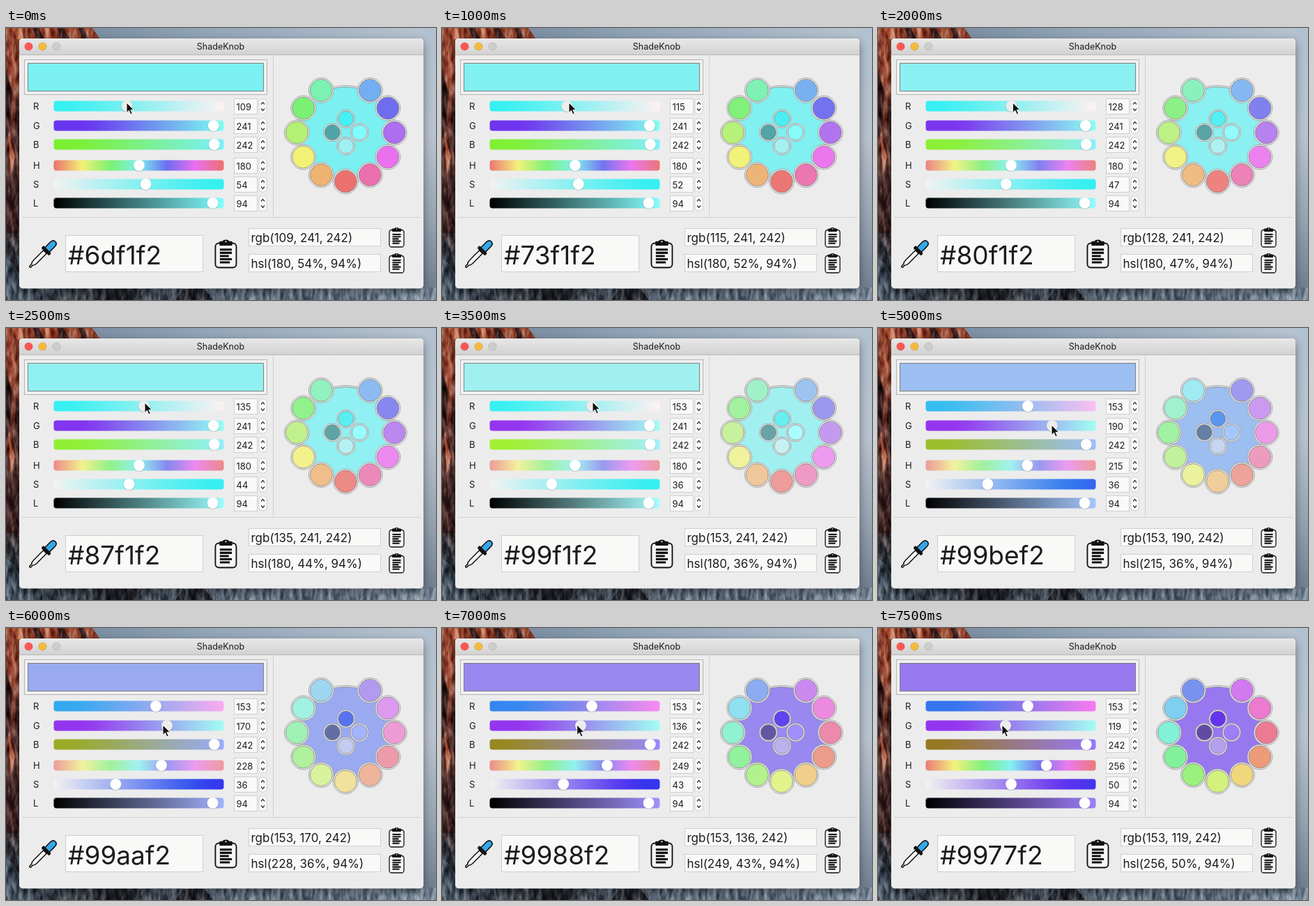
An HTML page for the animation above (8 s loop, 617x390 px).

```html
<!DOCTYPE html>
<html lang="en">
<head>
<meta charset="utf-8">
<title>ShadeKnob</title>
<style>
html, body { margin: 0; width: 100%; height: 100%; overflow: hidden; }
svg { display: block; width: 617px; height: 390px; }
text { font-family: Inter, sans-serif; font-size: 13px; fill: #1c1c1c; }
.big { font-size: 37px; }
.code { font-size: 17px; }
.field { fill: #f9faf8; stroke: #cfcfcf; }
.ring { fill: #f2f2f2; stroke: #9a9a9a; stroke-width: .9; }
.dot { stroke: #808080; stroke-width: .8; }
</style>
</head>
<body>
<svg id="stage" viewBox="0 0 617 390">
  <defs>
    <linearGradient id="sky" x1="0" x2="1" y1="0" y2=".25">
      <stop offset="0" stop-color="#6a7c92"/><stop offset=".45" stop-color="#93a5b8"/><stop offset="1" stop-color="#bcc8d4"/>
    </linearGradient>
    <linearGradient id="edge" x1="0" x2="0" y1="0" y2="1">
      <stop offset="0" stop-color="#b2c1d0"/><stop offset=".4" stop-color="#b9c3cf"/><stop offset=".7" stop-color="#98a4b2"/><stop offset="1" stop-color="#6a7a8b"/>
    </linearGradient>
    <linearGradient id="cliff" x1="0" x2="0" y1="0" y2="1">
      <stop offset="0" stop-color="#94452f"/><stop offset=".3" stop-color="#8a4435"/><stop offset=".6" stop-color="#452b2a"/><stop offset="1" stop-color="#333c47"/>
    </linearGradient>
    <linearGradient id="ground">
      <stop offset="0" stop-color="#44525f"/><stop offset=".25" stop-color="#33363d"/><stop offset=".42" stop-color="#566270"/><stop offset="1" stop-color="#748495"/>
    </linearGradient>
    <linearGradient id="bar" x1="0" x2="0" y1="0" y2="1">
      <stop offset="0" stop-color="#e8e8e8"/><stop offset="1" stop-color="#d2d2d2"/>
    </linearGradient>
    <filter id="blur" x="-20%" y="-20%" width="140%" height="140%"><feGaussianBlur stdDeviation="7"/></filter>
    <filter id="rock" x="0" y="0" width="100%" height="100%" color-interpolation-filters="sRGB">
      <feTurbulence type="fractalNoise" baseFrequency=".16 .05" numOctaves="3" seed="4"/>
      <feColorMatrix values="1.6 0 0 0 -.3  1.6 0 0 0 -.3  1.6 0 0 0 -.3  0 0 0 0 1" result="grain"/>
      <feBlend in="SourceGraphic" in2="grain" mode="overlay" result="mixed"/>
      <feBlend in="grain" in2="SourceGraphic" mode="soft-light"/>
      <feComposite in2="SourceGraphic" operator="in"/>
    </filter>
    <g id="clip">
      <rect x="1" y="3.5" width="21" height="24.5" rx="3.5" fill="#f4f4f4" stroke="#111" stroke-width="1.3"/>
      <path d="M5 5V2.5Q5 1.5 6.5 1.5H8Q9 0 11.5 0T15 1.5h1.5Q18 1.5 18 2.5V5Q18 6 17 6H6Q5 6 5 5Z" fill="#111"/>
      <circle cx="11.5" cy="2" r=".8" fill="#f4f4f4"/>
      <path d="M5.5 10h12M5.5 13.2h12M5.5 16.4h9M5.5 19.6h12M5.5 22.8h10" stroke="#111" stroke-width="2.1"/>
    </g>
  </defs>

  <path fill="url(#sky)" d="M0 0h617v390H0Z"/>
  <path fill="url(#edge)" d="M598 0h19v390h-19Z"/>
  <g filter="url(#rock)">
    <path fill="url(#cliff)" d="M0 0h124l14 20H24v370H0Z"/>
    <path fill="#3a201f" d="M38 0h9l8 16H44ZM74 0h8l10 16H78ZM104 0h7l8 16h-9ZM0 62l9 30-3 55-6 12ZM14 95l6 20v80l-8-34ZM0 210l13 24 7 60H0Z"/>
    <path fill="#bd6a4c" d="M10 0h11l5 16H15ZM55 0h7l5 16h-8ZM8 25l7 30-5 38ZM4 155l9 30-6 24Z"/>
    <path fill="url(#ground)" d="M0 316l20 12v44h597v18H0Z"/>
    <path fill="#23252c" d="M0 300l12 14 8 40-10-16-10-8ZM128 374h70l-16 16h-40ZM255 374h30l12 16h-54Z"/>
  </g>

  <rect x="19" y="20" width="580" height="358" rx="5" fill="#000" opacity=".42" filter="url(#blur)"/>
  <rect x="19" y="15" width="580" height="358.5" rx="5" fill="#ececec"/>
  <path d="M19 38V20q0-5 5-5h570q5 0 5 5v18Z" fill="url(#bar)"/>
  <path d="M19 38.5h580" stroke="#b9b9b9"/>
  <path d="M383.5 39v232M23 271.5h572" stroke="#d2d2d2"/>
  <g stroke="#000" stroke-opacity=".15" stroke-width=".7">
    <circle cx="32.5" cy="26.5" r="5.8" fill="#fc5753"/>
    <circle cx="52.5" cy="26.5" r="5.8" fill="#f4bb3c"/>
    <circle cx="72.5" cy="26.5" r="5.8" fill="#cdcdcd"/>
  </g>
  <text x="308" y="31.3" text-anchor="middle" style="font-size:12.5px">ShadeKnob</text>

  <rect x="26.5" y="45.5" width="348" height="50" fill="#f0f0f0" stroke="#b4b4b4"/>
  <rect id="swatch" x="31.5" y="50.5" width="338" height="40" stroke="#808080"/>
  <g id="sliders"></g>
  <g id="wheel"></g>

  <rect class="field" x="85.5" y="297.5" width="197" height="52"/>
  <rect class="field" x="348.5" y="287.5" width="189" height="25"/>
  <rect class="field" x="348.5" y="324.5" width="189" height="25"/>
  <text id="hex" class="big" x="89" y="339"></text>
  <text id="rgb" class="code" x="351.5" y="307"></text>
  <text id="hsl" class="code" x="351.5" y="344"></text>
  <use href="#clip" transform="translate(299 303.5) scale(1.43)"/>
  <use href="#clip" x="549" y="286"/>
  <use href="#clip" x="549" y="323"/>

  <g transform="translate(34 343) rotate(45)">
    <path d="M-3.2-31V-11Q-3.2-7-1.2-5V-1Q0 1 1.2-1V-5Q3.2-7 3.2-11V-31Z" fill="#f6f6f6" stroke="#111" stroke-width="1.5"/>
    <path d="M-4.6-35V-46Q-4.6-52 0-52T4.6-46V-35Z" fill="#35a7e8" stroke="#111" stroke-width="1.6"/>
    <rect x="-8" y="-36" width="16" height="5" rx="2" fill="#111"/>
  </g>

  <path id="cursor" d="M0 0v14.5l3.4-3.2 2.4 5.6 2.5-1.1-2.4-5.4h4.6Z" fill="#111" stroke="#fff" stroke-width="1"/>
</svg>
<script>
const $ = id => document.getElementById(id);
const DURATION = 8000, STEP = 500;

// time, red, green, cursor x, cursor y
const KEYS = [
  [0, 109, 241, 173, 107], [1000, 115, 241, 182, 107], [2500, 135, 241, 199, 107],
  [3500, 153, 241, 216, 106], [4000, 153, 241, 297, 139], [5000, 153, 190, 249, 139],
  [6000, 153, 170, 225, 139], [7500, 153, 119, 178, 139]
];
const BLUE = 242;
const CHANNELS = [['R', 112, 255], ['G', 140, 255], ['B', 167, 255], ['H', 197, 360], ['S', 224, 100], ['L', 251, 100]];

function add(parent, tag, attrs, content = '') {
  const node = document.createElementNS('http://www.w3.org/2000/svg', tag);
  for (const name in attrs) node.setAttribute(name, attrs[name]);
  node.textContent = content;
  parent.append(node);
  return node;
}

const clamp = v => Math.min(1, Math.max(0, v));

// Screen colour: sRGB nudged towards a wide-gamut display, with the deepest tones softened.
function paint(rgb) {
  const [r, g, b] = rgb.map(v => (v / 255) ** 2.2);
  const wide = [.8225 * r + .1775 * g, .0332 * r + .9668 * g, .0171 * r + .0724 * g + .9105 * b];
  const floor = Math.max(...rgb) * .22;
  return `rgb(${rgb.map((v, i) => Math.round(Math.max(floor, v * .6 + 255 * wide[i] ** (1 / 2.2) * .4)))})`;
}

function toHsv([r, g, b]) {
  const max = Math.max(r, g, b), span = max - Math.min(r, g, b);
  const sector = max === r ? (g - b) / span + 6 : max === g ? (b - r) / span + 2 : (r - g) / span + 4;
  return [sector * 60 % 360, span / max, max / 255];
}

function fromHsv(h, s, v) {
  return [5, 3, 1].map(n => {
    const k = (n + h / 60) % 6;
    return 255 * clamp(v) * (1 - clamp(s) * Math.max(0, Math.min(k, 4 - k, 1)));
  });
}

const STOPS = 12;
const sliders = CHANNELS.map(([label, y], i) => {
  const box = $('sliders');
  const gradient = add(box, 'linearGradient', { id: 'track' + i });
  const stops = Array.from({ length: STOPS + 1 }, (_, n) => add(gradient, 'stop', { offset: n / STOPS }));
  add(box, 'text', { x: 39, y: y + 5 }, label);
  add(box, 'rect', { x: 68.5, y: y - 7.5, width: 244, height: 15, rx: 4, fill: `url(#track${i})` });
  add(box, 'rect', { class: 'field', x: 327.5, y: y - 10.5, width: 33, height: 22 });
  add(box, 'rect', { x: 363, y: y - 10, width: 11, height: 21, rx: 4, fill: '#fcfcfc', stroke: '#cacaca', 'stroke-width': .8 });
  add(box, 'path', { d: `M366 ${y - 2.5}l2.5-3 2.5 3M366 ${y + 3.5}l2.5 3 2.5-3`, fill: 'none', stroke: '#333', 'stroke-width': 1.2 });
  const value = add(box, 'text', { x: 330.5, y: y + 6 });
  const shade = add(box, 'circle', { r: 8.6, cy: y + .5, fill: '#000', opacity: .16 });
  const knob = add(box, 'circle', { r: 8, cy: y });
  return { stops, value, shade, knob };
});

function disc(x, y, r) {
  add($('wheel'), 'circle', { class: 'ring', cx: x, cy: y, r });
  return add($('wheel'), 'circle', { class: 'dot', cx: x, cy: y, r: r - 1.9 });
}

const base = disc(487.5, 150, 67.5);
const outer = Array.from({ length: 11 }, (_, i) => {
  const angle = (i + 1) * Math.PI / 6;
  return disc(487.3 + 70 * Math.sin(angle), 150 - 70 * Math.cos(angle), 17.9);
});
const inner = [[0, -19.5], [19.5, 0], [0, 19.5], [-19.5, 0]].map(([x, y]) => disc(487.8 + x, 149.7 + y, 13));

function stateAt(t) {
  const next = KEYS.findIndex(key => key[0] > t);
  if (next < 0) return KEYS[KEYS.length - 1];
  const a = KEYS[next - 1], b = KEYS[next], p = (t - a[0]) / (b[0] - a[0]);
  return a.map((v, i) => v + (b[i] - v) * p);
}

function draw(t) {
  const [, red, green, cx, cy] = stateAt(t);
  const rgb = [Math.round(red), Math.round(green), BLUE];
  const [h, s, v] = toHsv(rgb);
  const hsv = [Math.floor(h), Math.floor(s * 100), Math.floor(v * 100)];
  const values = [...rgb, ...hsv];
  const active = t < 4000 ? 0 : 1;

  const along = (channel, p) => {
    if (channel < 3) return rgb.map((c, i) => i === channel ? 255 * p : c);
    return fromHsv(channel === 3 ? 360 * p : h, channel === 4 ? p : s, channel === 5 ? p : v);
  };
  sliders.forEach(({ stops, value, shade, knob }, i) => {
    stops.forEach((stop, n) => stop.setAttribute('stop-color', paint(along(i, n / STOPS))));
    const x = 71 + 240 * values[i] / CHANNELS[i][2];
    knob.setAttribute('cx', x);
    shade.setAttribute('cx', x);
    knob.setAttribute('fill', i === active ? '#ececec' : '#fff');
    value.textContent = values[i];
  });

  const fill = (node, color) => node.setAttribute('fill', paint(color));
  fill($('swatch'), rgb);
  fill(base, rgb);
  outer.forEach((node, i) => fill(node, fromHsv((h + 30 * (i + 1)) % 360, s, v)));
  [[.28, 0], [0, .1], [-.17, 0], [.04, -.3]].forEach(([ds, dv], i) => fill(inner[i], fromHsv(h, s + ds, v + dv)));

  $('hex').textContent = '#' + rgb.map(c => c.toString(16).padStart(2, '0')).join('');
  $('rgb').textContent = `rgb(${rgb.join(', ')})`;
  $('hsl').textContent = `hsl(${hsv[0]}, ${hsv[1]}%, ${hsv[2]}%)`;
  $('cursor').setAttribute('transform', `translate(${cx} ${cy})`);
}

const start = performance.now();
let shown = -1;
function tick() {
  const t = Math.floor((performance.now() - start) % DURATION / STEP) * STEP;
  if (t !== shown) draw(shown = t);
  requestAnimationFrame(tick);
}
tick();
</script>
</body>
</html>
```
